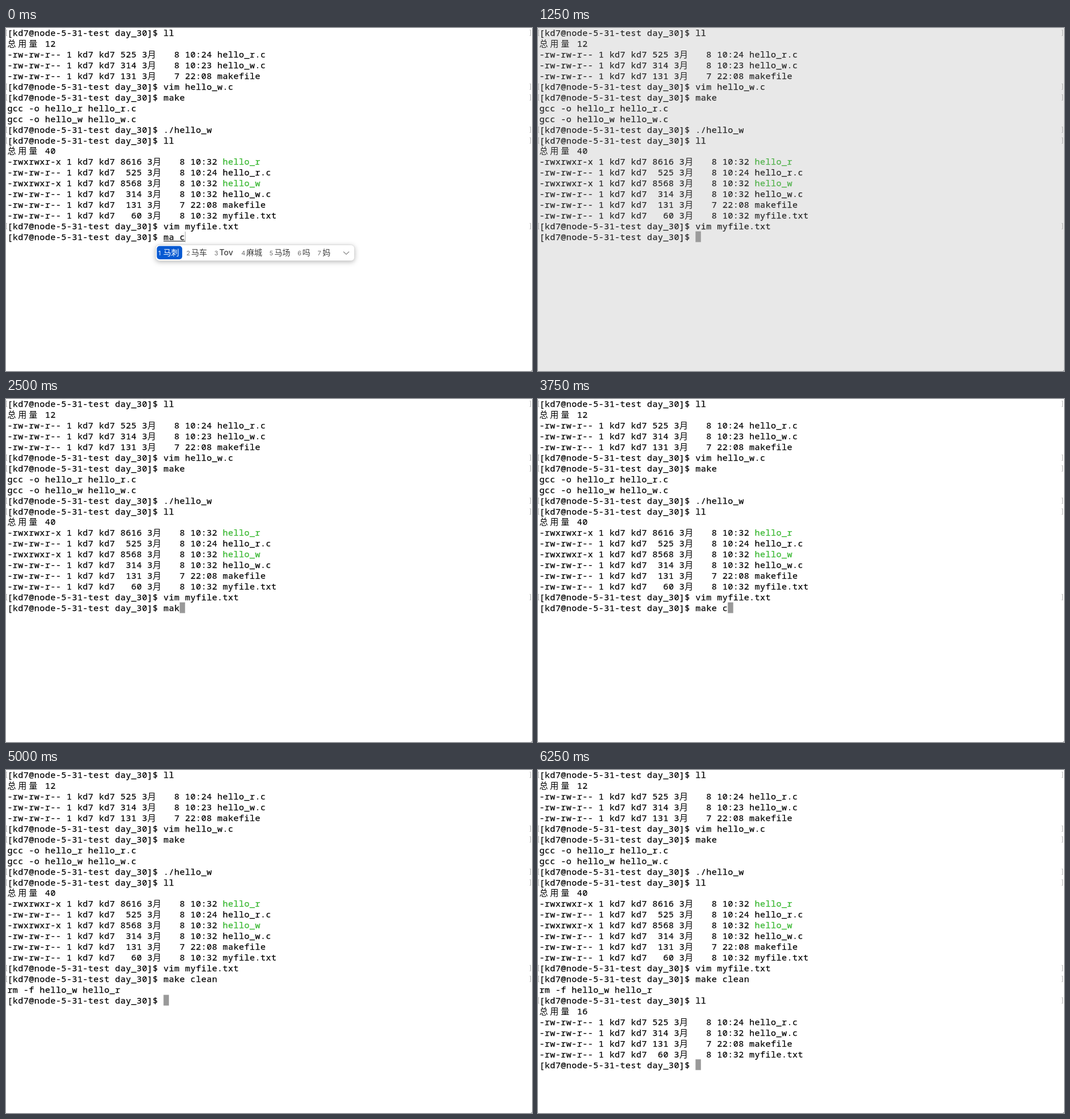
Animation of 926 by 605 pixels, one loop 8000 ms. Source, as an HTML page:

```html
<!DOCTYPE html>
<html lang="zh-CN">
<head>
<meta charset="utf-8">
<title>Terminal session</title>
<style>
  html, body { margin: 0; width: 100%; height: 100%; overflow: hidden; background: #fff; }
  svg { display: block; width: 926px; height: 605px; }
  text { white-space: pre; }
  .mono { font: 500 15px "Noto Sans Mono", "DejaVu Sans Mono", monospace; letter-spacing: .48px;
          font-variant-ligatures: none; stroke: #000; stroke-width: .25px; }
  .han { font: 500 15px "Noto Sans CJK SC", "Noto Sans CJK", sans-serif; letter-spacing: 3.96px; }
  .green { fill: #36b62e; stroke: #36b62e; }
  .mark { fill: none; stroke: #b4b4b4; }
  .cursor { fill: #999; }
  .popup { filter: drop-shadow(0 2px 4.5px rgba(0, 0, 0, .27)); }
  .word { font: 500 14px Inter, "Noto Sans CJK SC", "Noto Sans CJK", sans-serif; fill: #404040; }
  .digit { font: 11px Inter, sans-serif; fill: #707070; }
  .picked { fill: #fff; }
</style>
</head>
<body>
<svg id="stage" viewBox="0 0 926 605" xmlns="http://www.w3.org/2000/svg"></svg>
<script>
const LOOP = 8000;
const CELL = 9.48, LEFT = 2.4, ROW = 18.96, TOP = -1.6, BASE = 13.92;
const USER = 'kd7';
const PROMPT = `[${USER}@node-5-31-test day_30]$ `;

const colX = col => LEFT + col * CELL;
const rowY = row => TOP + row * ROW;
const baseline = row => Math.round(BASE + row * ROW);
const run = text => ({ command: text });
const file = (size, date, name, exec = false) => ({
  text: `${exec ? '-rwxrwxr-x' : '-rw-rw-r--'} 1 ${USER} ${USER} ${size} 3月   ${date} `,
  name, exec
});

const history = [
  run('ll'),
  { text: '总用量 12' },
  file('525', '8 10:24', 'hello_r.c'),
  file('314', '8 10:23', 'hello_w.c'),
  file('131', '7 22:08', 'makefile'),
  run('vim hello_w.c'),
  run('make'),
  { text: 'gcc -o hello_r hello_r.c' },
  { text: 'gcc -o hello_w hello_w.c' },
  run('./hello_w'),
  run('ll'),
  { text: '总用量 40' },
  file('8616', '8 10:32', 'hello_r', true),
  file(' 525', '8 10:24', 'hello_r.c'),
  file('8568', '8 10:32', 'hello_w', true),
  file(' 314', '8 10:32', 'hello_w.c'),
  file(' 131', '7 22:08', 'makefile'),
  file('  60', '8 10:32', 'myfile.txt'),
  run('vim myfile.txt')
];
const cleaned = [run('make clean'), { text: 'rm -f hello_w hello_r' }];
const listed = [
  run('ll'),
  { text: '总用量 16' },
  file('525', '8 10:24', 'hello_r.c'),
  file('314', '8 10:32', 'hello_w.c'),
  file('131', '7 22:08', 'makefile'),
  file(' 60', '8 10:32', 'myfile.txt')
];

// Each step holds until the next one starts.
const steps = [
  { at: 0, compose: 'ma c', words: '马刺 马车 Tov 麻城 马场 吗 妈' },
  { at: 750, compose: 'ma', words: '吗 嘛 妈 马 骂 码 麻 蚂 玛' },
  { at: 1000, compose: 'm' },
  { at: 1250, typed: '', flash: true },
  { at: 1500, typed: '' },
  { at: 1750, typed: 'm' },
  { at: 2000, typed: 'ma' },
  { at: 2500, typed: 'mak' },
  { at: 2750, typed: 'make' },
  { at: 3250, typed: 'make ' },
  { at: 3750, typed: 'make c' },
  { at: 4000, typed: 'make cle' },
  { at: 4250, typed: 'make clea' },
  { at: 4500, typed: 'make clean' },
  { at: 5000, typed: '', output: cleaned },
  { at: 5750, typed: 'l', output: cleaned },
  { at: 6000, typed: 'll', output: cleaned, entered: true },
  { at: 6250, typed: '', output: [...cleaned, ...listed] }
];

function gridText(text, row, col = 0, cls = '') {
  let out = '';
  for (const part of text.match(/[\u4e00-\u9fff]+|[^\u4e00-\u9fff]+/g) || []) {
    const han = part.charCodeAt(0) > 0x4dff;
    out += `<text class="${han ? 'han' : 'mono'} ${cls}" x="${colX(col)}" y="${baseline(row)}">${part}</text>`;
    col += part.length * (han ? 2 : 1);
  }
  return out;
}

function marks(row) {
  const y = baseline(row) - 10.5;
  return `<path class="mark" d="M2 ${y}H.5v10H2M922 ${y}h1.5v10H922"/>`;
}

function line(item, row) {
  if (item.command !== undefined) return marks(row) + gridText(PROMPT + item.command, row);
  const name = item.name || '';
  const col = item.text.length + (item.text.includes('月') ? 1 : 0);
  return gridText(item.text, row) + gridText(name, row, col, item.exec ? 'green' : '');
}

function popup(words) {
  let x = 268, out = '';
  words.split(' ').forEach((word, i) => {
    const width = 14.1 * (/[A-Z]/.test(word) ? 1.87 : word.length);
    const picked = i ? '' : 'picked';
    if (!i) out += `<rect x="265.5" y="384.5" width="${width + 16.5}" height="23.5" rx="5" fill="#0759d2"/>`;
    out += `<text class="digit ${picked}" x="${x}" y="400.5">${i + 1}</text>
      <text class="word ${picked}" x="${x + 8.7}" y="401">${word}</text>`;
    x += width + 21.2;
  });
  return `<rect class="popup" x="263.5" y="382.5" width="350" height="28" rx="6" fill="#fff" stroke="#d2d2d2" stroke-width=".7"/>
    ${out}<path d="M594 394.5l5 4.7 5-4.7" fill="none" stroke="#888" stroke-width="1.2"/>`;
}

function screen({ compose, words, typed, output = [], flash, entered }) {
  const lines = [...history, ...output];
  const row = lines.length;
  const input = compose || typed;
  const x = colX(PROMPT.length + input.length), y = rowY(row);
  let out = '<rect width="926" height="605" fill="#fff"/>' + lines.map(line).join('');
  if (entered) out += marks(row);
  out += gridText(PROMPT + input, row);
  if (compose) {
    out += `<path d="M${colX(PROMPT.length)} ${baseline(row) + 2}H${x}" stroke="#000"/>
      <path d="M${x + .3} ${y + .5}v18.5" stroke="#aaa"/>`;
  } else {
    out += `<rect class="cursor" x="${x}" y="${y}" width="${CELL}" height="${ROW}"/>`;
  }
  if (words) out += popup(words);
  if (flash) out += '<rect width="926" height="605" fill="#9e9e9e" opacity=".24"/>';
  return out + '<path d="M926 603v2h-2z" fill="#999"/>';
}

const stage = document.getElementById('stage');
const start = performance.now();
let shown;

function tick() {
  const t = (performance.now() - start) % LOOP;
  const step = steps.filter(s => s.at <= t).pop();
  if (step !== shown) {
    stage.innerHTML = screen(step);
    shown = step;
  }
  requestAnimationFrame(tick);
}
tick();
</script>
</body>
</html>
```
